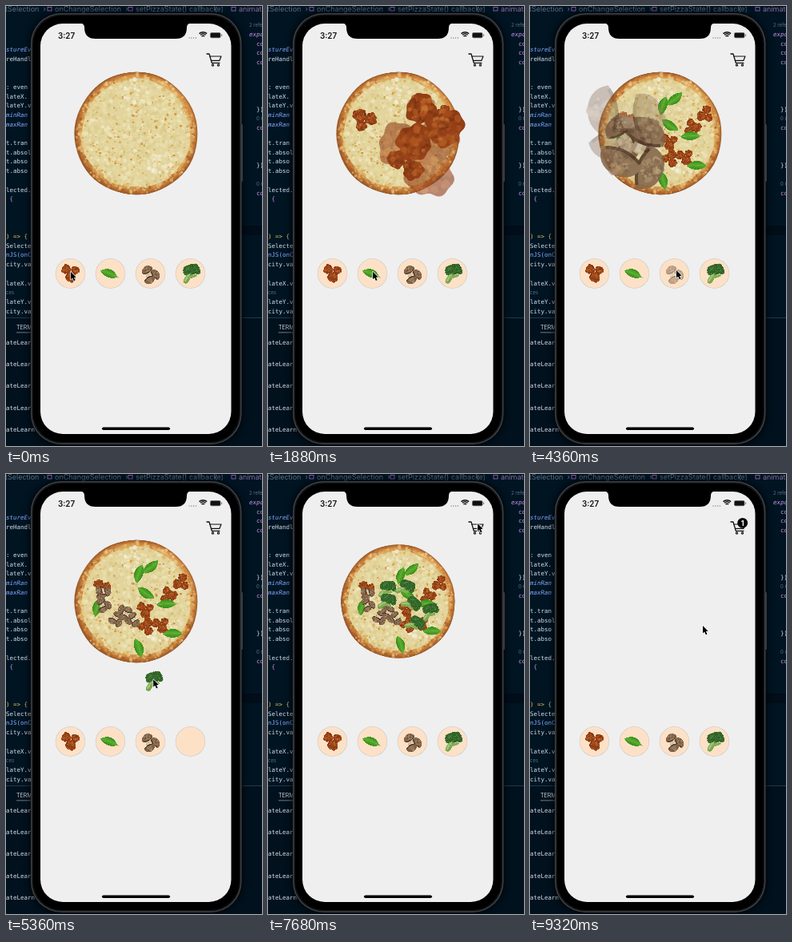
An HTML page with a canvas for the animation above (9.36 s loop, 320x551 px).

```html
<!DOCTYPE html>
<html lang="en">
<head>
<meta charset="utf-8">
<title>Pizza builder</title>
<style>
html, body { margin: 0; width: 100%; height: 100%; overflow: hidden; background: #011422; }
canvas { display: block; width: 320px; height: 551px; }
</style>
</head>
<body>
<canvas id="stage"></canvas>
<script>
const W = 320, H = 551, LOOP = 9360, TAU = Math.PI * 2;
const dpr = Math.max(1, window.devicePixelRatio || 1);
const MONO = '"DejaVu Sans Mono", monospace';
const SANS = 'Inter, sans-serif';
const INK = '#111', SCREEN = '#efeff0';

const clamp = v => Math.min(1, Math.max(0, v));
const span = (t, a, b) => clamp((t - a) / (b - a));
const mix = (a, b, p) => a + (b - a) * p;
const ease = p => p < .5 ? 4 * p ** 3 : 1 - (2 - 2 * p) ** 3 / 2;

function seeded(seed) {
  return () => (seed = (seed * 16807) % 2147483647) / 2147483647;
}

function layer(w, h, scale, draw) {
  const c = document.createElement('canvas');
  c.width = Math.round(w * scale);
  c.height = Math.round(h * scale);
  const g = c.getContext('2d');
  g.scale(scale, scale);
  draw(g);
  return c;
}

function dot(g, x, y, r, fill) {
  g.fillStyle = fill;
  g.beginPath();
  g.arc(x, y, r, 0, TAU);
  g.fill();
}

function box(g, x, y, w, h, r, fill) {
  g.fillStyle = fill;
  g.beginPath();
  g.roundRect(x, y, w, h, r);
  g.fill();
}

function text(g, s, x, y, font, fill) {
  g.font = font;
  g.fillStyle = fill;
  g.fillText(s, x, y);
}

function line(g, points, width, color) {
  g.strokeStyle = color;
  g.lineWidth = width;
  g.beginPath();
  points.forEach(([x, y]) => g.lineTo(x, y));
  g.stroke();
}

// Closed wobbly outline around a centre.
function blob(g, x, y, r, wobble, rnd, fill) {
  const a = rnd() * TAU, b = rnd() * TAU;
  g.beginPath();
  for (let i = 0; i < 60; i++) {
    const q = i / 60 * TAU;
    const d = r * (1 + wobble * (Math.sin(q * 3 + a) + .7 * Math.sin(q * 7 + b)));
    g.lineTo(x + d * Math.cos(q), y + d * Math.sin(q));
  }
  g.fillStyle = fill;
  g.fill();
}

// Random dots between two radii.
function speckle(g, rnd, n, [x, y], [inner, outer], [min, max], colors) {
  for (let i = 0; i < n; i++) {
    const a = rnd() * TAU, d = Math.sqrt(mix(inner ** 2, outer ** 2, rnd()));
    g.globalAlpha = .3 + rnd() * .5;
    dot(g, x + d * Math.cos(a), y + d * Math.sin(a), mix(min, max, rnd()), colors[i % colors.length]);
  }
  g.globalAlpha = 1;
}

// Ingredient art lives in a 100-unit square centred on the origin.
const art = {
  chicken(g) {
    const rnd = seeded(17);
    [[-20, -20, 23], [23, -15, 20], [2, 18, 25]].forEach(([x, y, r]) => {
      blob(g, x, y, r, .09, rnd, '#923e16');
      speckle(g, rnd, 70, [x, y], [0, r - 3], [1, 5], ['#74300f', '#ad5320', '#a3481b', '#c5722f']);
    });
  },
  leaf(g) {
    const fill = g.createLinearGradient(0, -22, 0, 22);
    fill.addColorStop(0, '#2c8216');
    fill.addColorStop(.5, '#58ac2b');
    fill.addColorStop(1, '#338a1a');
    g.fillStyle = fill;
    g.beginPath();
    g.moveTo(-50, 7);
    g.bezierCurveTo(-28, -18, 2, -32, 38, 2);
    g.bezierCurveTo(18, 25, -22, 28, -50, 7);
    g.fill();
    line(g, [[-48, 7], [0, 2], [38, 2], [52, 4]], 1.8, '#6fb341');
    for (let x = -34; x < 32; x += 10) {
      const d = 15 * Math.cos(x / 44);
      line(g, [[x - 2, 3 - d], [x + 7, 3], [x - 2, 3 + d]], .6, '#67ae38');
    }
  },
  mushroom(g) {
    const rnd = seeded(41);
    [[-13, -12, -.6], [20, 8, .9], [-6, 25, 2.6]].forEach(([x, y, turn]) => {
      g.save();
      g.translate(x, y);
      g.rotate(turn);
      box(g, -8, -6, 16, 29, 6, '#c9b592');
      box(g, -4, 0, 7, 21, 4, '#ddcfb2');
      g.fillStyle = '#806248';
      g.beginPath();
      g.moveTo(-28, 2);
      g.bezierCurveTo(-30, -33, 28, -33, 28, 2);
      g.quadraticCurveTo(0, 16, -28, 2);
      g.fill();
      speckle(g, rnd, 55, [0, -10], [0, 15], [1, 4], ['#9b7d5d', '#6d503a', '#b39a78']);
      g.strokeStyle = '#493324';
      g.lineWidth = 4;
      g.beginPath();
      g.moveTo(-24, 2);
      g.quadraticCurveTo(0, 14, 24, 2);
      g.stroke();
      g.restore();
    });
  },
  broccoli(g) {
    const rnd = seeded(73);
    g.lineCap = 'round';
    line(g, [[-22, 36], [0, 0]], 25, '#79a64e');
    line(g, [[-26, 34], [-7, 5]], 10, '#a2c477');
    line(g, [[-8, 20], [25, 10]], 12, '#84ae57');
    for (let i = 0; i < 8; i++) {
      const a = -3.3 + i * .55, r = 15 + 3 * Math.sin(i * 2);
      const at = i < 7 ? [8 + 28 * Math.cos(a), -10 + 22 * Math.sin(a)] : [9, -12];
      blob(g, ...at, r, .06, rnd, '#30622a');
      speckle(g, rnd, 90, at, [0, r], [.8, 2.6], ['#28541f', '#41792f', '#37702b', '#66994b']);
    }
  }
};

function drawPizza(g) {
  const rnd = seeded(2027), mid = [0, 0];
  g.translate(80, 80);
  const crust = g.createRadialGradient(5, -5, 60, 0, 0, 78);
  crust.addColorStop(0, '#e9bd72');
  crust.addColorStop(.6, '#d3914a');
  crust.addColorStop(1, '#8f4b1c');
  blob(g, 0, 0, 77, .005, rnd, crust);
  speckle(g, rnd, 450, mid, [66, 75], [.6, 2.2], ['#a85a22', '#e5b368', '#c97c38', '#efcd8c']);
  blob(g, 0, 0, 68, .012, rnd, '#e2d49c');
  speckle(g, rnd, 160, mid, [63, 71], [1, 3], ['#e6cd8a', '#d9a54f']);
  speckle(g, rnd, 1000, mid, [0, 67], [.7, 3], ['#ebe1b0', '#d9c888', '#e6daa2', '#f1e9c6']);
  speckle(g, rnd, 230, mid, [0, 66], [.6, 1.5], ['#d08b24', '#dba33a', '#c97f20']);
  [[30, 38], [-4, -54]].forEach(at => speckle(g, rnd, 24, at, [0, 16], [1, 3], ['#f5f0da']));
}

const ROW = 11.7;
const leftCode = `stureEv
reHandl


: even
lateX.
lateY.v
minRan
maxRan

t.tran
t.absol
t.abso
t.abso

lected.
 {



) => {
Selecte
nJS(onC
city.va

lateX.v
ces
lateY.v
city.va`;
const rightCode = 'expo\nco\nco\nco\n\n\n\n\n})\n0 re\nco\n\n\n\n})\n\n0 r\nco';

// First matching rule styles a whole row of code.
const syntax = [
  [/^(0|ces)/, '#56728c', '6px ' + SANS],
  [/Ran|stureEv/, '#82aaff', 'italic 7.5px ' + MONO],
  [/nJS/, '#82aaff'],
  [/expo/, '#c792ea', 'italic 7.5px ' + MONO],
  [/^co|^ {/, '#c792ea'],
  [/=>/, '#e3c75c'],
  [/./, '#d6deeb']
];

function drawCode(g, code, x, y) {
  code.split('\n').forEach((s, i) => {
    if (!s) return;
    const [, color, font = '7.5px ' + MONO] = syntax.find(([rule]) => rule.test(s));
    text(g, s, x - (s === 'expo' ? 9 : 0), y + i * ROW, font, color);
  });
}

function drawEditor(g) {
  g.fillStyle = '#011422';
  g.fillRect(0, 0, W, H);
  const crumb = '9px ' + SANS, gray = '#5b6f83';
  text(g, 'tSelection  ›', -1, 7, crumb, gray);
  text(g, 'onChangeSelection  ›', 61, 7, crumb, gray);
  text(g, 'setPizzaState() callback', 162, 7, crumb, gray);
  text(g, '[e]', 261, 7, '8px ' + SANS, gray);
  text(g, 'animate', 291, 7, crumb, '#8a6f9f');
  g.strokeStyle = '#8a63a5';
  g.lineWidth = .9;
  [52, 153, 282].forEach(x => g.strokeRect(x, 1.5, 5, 4.5));

  drawCode(g, leftCode, 0, 57);
  drawCode(g, rightCode, 313, 38);
  text(g, '2 refer', 304, 26, '6px ' + SANS, '#56728c');
  box(g, 290, 275, 30, 12, 0, '#010d19');

  box(g, 0, 391, W, 160, 0, '#01111d');
  box(g, 0, 390, W, .8, 0, '#29465a');
  text(g, 'TERM', 13, 405, '7px ' + SANS, '#c7d2dc');
  box(g, 13, 408.5, 20, .8, 0, '#8498aa');
  for (let i = 0; i < 5; i++) text(g, 'ateLearn', 0, 424 + i * 27.2, '7.5px ' + MONO, '#d6deeb');
}

function drawCart(g) {
  g.lineJoin = g.lineCap = 'round';
  line(g, [[251, 60], [254, 60], [257.3, 71.3], [267, 71.3]], 1.3, INK);
  line(g, [[254.8, 63], [269, 63], [266.8, 68.4], [256.5, 68.4]], 1.2, INK);
  [258.5, 265.5].forEach(x => {
    dot(g, x, 74, 1.7, INK);
    dot(g, x, 74, .6, SCREEN);
  });
}

function drawStatus(g) {
  text(g, '3:27', 65, 40.5, '600 9.8px ' + SANS, INK);
  for (let i = 0; i < 4; i++) dot(g, 229 + i * 2.8, 40, .7, '#9b7777');
  g.strokeStyle = INK;
  g.lineWidth = 1.5;
  for (let r = 2.7; r < 8; r += 2.25) {
    g.beginPath();
    g.arc(246.3, 40, r, -2.3, -.84);
    g.stroke();
  }
  box(g, 255, 33, 13.5, 7.3, 2, '#8a8a8a');
  box(g, 255.7, 33.7, 12.1, 5.9, 1.4, INK);
  box(g, 269.1, 35.3, 1, 2.7, .5, '#777');
}

function drawPhone(g) {
  g.save();
  g.shadowColor = '#000';
  g.shadowBlur = 10 * dpr;
  box(g, 31, 9, 263.5, 540, 38, '#3d4043');
  g.restore();
  box(g, 292, 148, 4, 72, 1, '#363b40');
  box(g, 32.5, 10.5, 260.5, 537, 37, '#111214');
  box(g, 34, 12, 257.5, 534, 36, '#000');
  box(g, 43, 22, 238.5, 514, 28, SCREEN);
  // Notch with flared shoulders.
  g.fillStyle = '#000';
  g.beginPath();
  g.moveTo(93, 21.5);
  g.quadraticCurveTo(98, 22, 98, 27);
  g.quadraticCurveTo(98, 41, 112, 41);
  g.lineTo(212, 41);
  g.quadraticCurveTo(226, 41, 226, 27);
  g.quadraticCurveTo(226, 22, 231, 21.5);
  g.fill();

  drawStatus(g);
  drawCart(g);
  items.forEach(({ slot }) => {
    dot(g, slot, TRAY, 18.7, '#c9c5c2');
    dot(g, slot, TRAY, 18.2, '#fde1c7');
  });
  box(g, 120, 527.4, 85, 3.6, 1.8, '#000');
}

// Each item is picked, dropped at a point, and left there by the cursor.
const TRAY = 335;
const items = [
  { name: 'chicken', pick: 120, drop: 1140, leave: 1300, at: [162, 160], size: 24, spin: 1.2,
    pieces: [[174, 171], [218, 136], [119, 141], [176, 190], [204, 152], [194, 190]] },
  { name: 'leaf', pick: 2050, drop: 2640, leave: 3050, at: [153, 133], size: 28, spin: -1.25,
    pieces: [[202, 162], [114, 165], [173, 149], [180, 118], [167, 219], [210, 199], [166, 123]] },
  { name: 'mushroom', pick: 3500, drop: 3970, leave: 4030, at: [145, 145], size: 22, spin: 1,
    pieces: [[122, 163], [139, 181], [122, 149], [158, 184], [147, 174]] },
  { name: 'broccoli', pick: 5000, drop: 5860, leave: 6450, at: [113, 142], size: 26, spin: .2,
    pieces: [[205, 174], [147, 143], [147, 160], [172, 141], [185, 190], [180, 163]] }
];
items.forEach((item, i) => {
  item.slot = 80.5 + i * 50;
  item.turn = item.name === 'leaf' ? .42 : 0;
  item.land = item.drop + 40;
});

const cursorPath = [
  ...items.flatMap(({ slot, pick, drop, leave, at }) => [
    [pick - 120, slot + .5, 333], [pick, slot + .5, 333], [drop - 80, ...at], [leave, ...at]
  ]),
  [4340, 183, 331], [7380, 262, 62], [8050, 262, 62], [8800, 216, 190], [LOOP, 216, 190]
].sort((a, b) => a[0] - b[0]);

function cursorAt(t) {
  const i = Math.max(1, cursorPath.findIndex(p => p[0] >= t));
  const [ta, xa, ya] = cursorPath[i - 1], [tb, xb, yb] = cursorPath[i];
  const p = ease(span(t, ta, tb));
  return [mix(xa, xb, p), mix(ya, yb, p)];
}

const scene = layer(W, H, dpr, g => { drawEditor(g); drawPhone(g); });
const pizza = layer(160, 160, 2 * dpr, drawPizza);
const sprites = {};
for (const name in art) {
  sprites[name] = layer(110, 110, 2, g => { g.translate(55, 55); art[name](g); });
}

const stage = document.getElementById('stage');
stage.width = W * dpr;
stage.height = H * dpr;
const ctx = stage.getContext('2d');

function stamp(name, x, y, size, turn, alpha = 1) {
  const s = size * 1.1;
  ctx.save();
  ctx.globalAlpha = alpha;
  ctx.translate(x, y);
  ctx.rotate(turn);
  ctx.drawImage(sprites[name], -s / 2, -s / 2, s, s);
  ctx.restore();
}

// Pieces fade in large, one after another, and shrink into place.
function drawPieces({ name, land, size, spin, pieces }, t) {
  pieces.forEach(([x, y], i) => {
    const from = land + i * 100, p = span(t, from, from + 700);
    stamp(name, x, y, size * mix(5.3, 1, ease(p)), spin * i, span(p, .12, .4));
  });
}

function drawMeal(t) {
  const fly = ease(span(t, 8120, 8620));
  const s = mix(1, .16, span(t, 7610, 8410)) * (1 - fly);
  if (s < .005) return;
  ctx.save();
  ctx.translate(mix(162.5, 262, fly), mix(159.7, 66, fly));
  ctx.scale(s, s);
  ctx.translate(-162.5, -159.7);
  ctx.drawImage(pizza, 82.5, 79.7, 160, 160);
  items.forEach(item => drawPieces(item, t));
  ctx.restore();
}

function drawTray(t, cx, cy) {
  items.forEach(({ name, slot, turn, pick, drop, land }) => {
    const held = t > pick && t < drop;
    const [px, py] = held ? cursorAt(pick) : [cx, cy];
    const alpha = t < drop ? 1 - span(t, drop - 60, drop) : span(t, land + 325, land + 375);
    stamp(name, slot + cx - px, TRAY + cy - py, 26, turn, alpha);
  });
}

function drawBadge(t) {
  const s = ease(span(t, 8540, 8700));
  if (!s) return;
  ctx.save();
  ctx.translate(265.7, 61.3);
  ctx.scale(s, s);
  dot(ctx, 0, 0, 6.4, '#000');
  ctx.textAlign = 'center';
  text(ctx, '1', 0, 3.2, '700 9px ' + SANS, '#fff');
  ctx.restore();
}

function drawCursor(x, y) {
  ctx.save();
  ctx.translate(x, y);
  ctx.beginPath();
  [[0, 0], [0, 9.5], [2.1, 7.6], [3.8, 11.3], [5.5, 10.5], [3.9, 7], [6.7, 6.8]]
    .forEach(([a, b]) => ctx.lineTo(a, b));
  ctx.closePath();
  ctx.lineJoin = 'round';
  ctx.lineWidth = 1.3;
  ctx.strokeStyle = '#fff';
  ctx.stroke();
  ctx.fillStyle = '#000';
  ctx.fill();
  ctx.restore();
}

const start = performance.now();
function render(now) {
  const t = Math.max(0, now - start) % LOOP;
  const [x, y] = cursorAt(t);
  ctx.setTransform(dpr, 0, 0, dpr, 0, 0);
  ctx.drawImage(scene, 0, 0, W, H);
  drawMeal(t);
  drawTray(t, x, y);
  drawBadge(t);
  drawCursor(x, y);
  requestAnimationFrame(render);
}
render(start);
</script>
</body>
</html>
```
